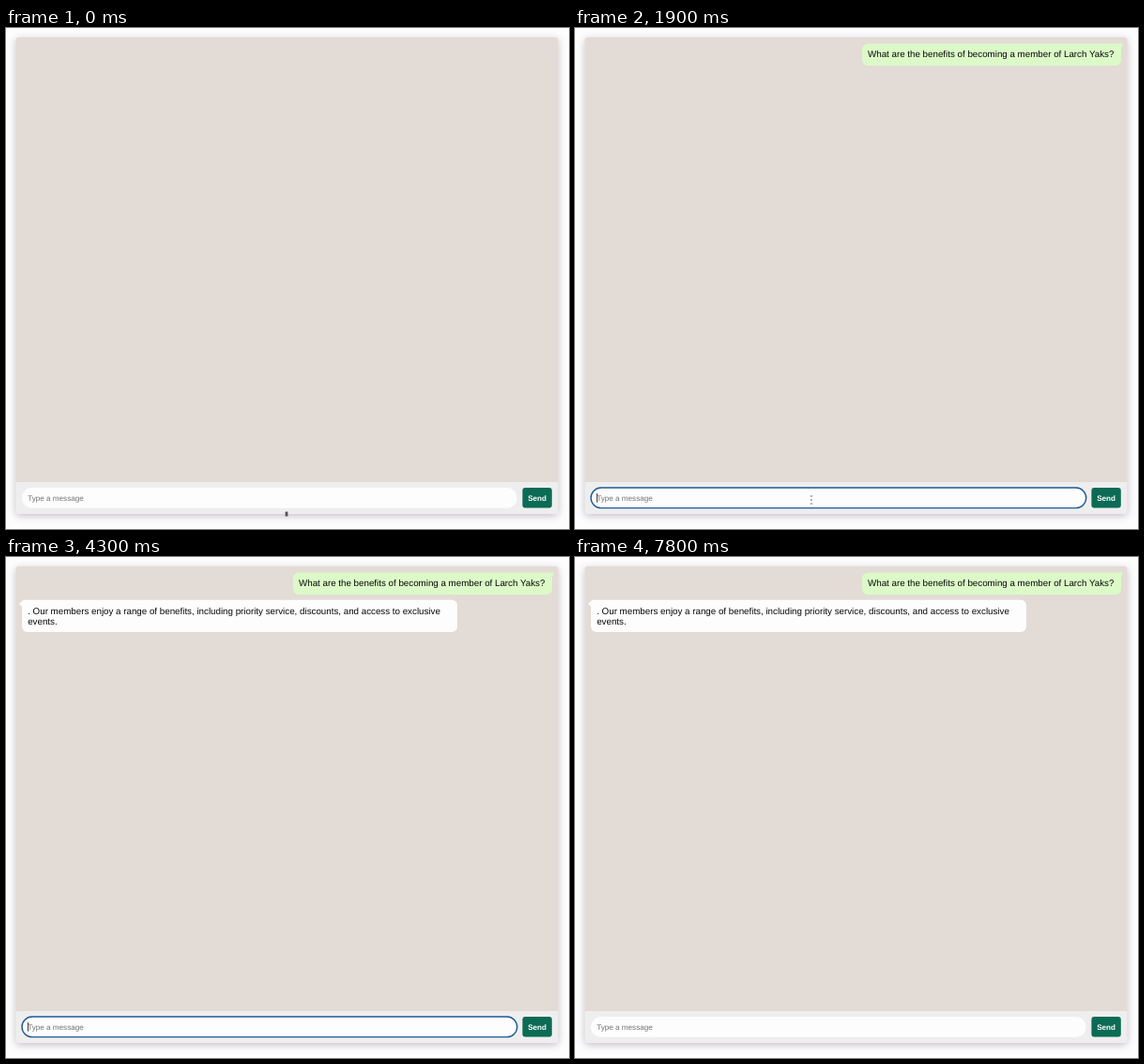
Write an HTML page that moves like this. It is 600 px wide and 534 px high and loops after 8 s.

```html
<!DOCTYPE html>
<html lang="en">
<head>
<meta charset="utf-8">
<title>Chat</title>
<style>
  html, body {
    margin: 0;
    width: 100%;
    height: 100%;
    overflow: hidden;
    background: #fefdfe;
  }
  svg {
    display: block;
    width: 600px;
    height: 534px;
    font-family: "Liberation Sans", Arial, sans-serif;
    text-rendering: geometricPrecision;
  }
  .panel { filter: drop-shadow(0 2px 4px rgba(40, 30, 50, .28)); }
  .msg { font-size: 9.77px; fill: #080808; }
  .small { font-size: 8.13px; }

  /* Everything switches in hard cuts on one 8 s clock. */
  .sent, .reply, .ring, .caret, .pointer { animation: 8s step-end infinite; }
  .sent { animation-name: sent; }
  .reply { animation-name: reply; }
  .ring { animation-name: focus; }
  .caret { animation-name: blink; }
  .pointer { animation-name: enter; }
  .tip, .beam { animation: 8s step-end infinite; }
  .tip { animation-name: tip; }
  .beam { animation-name: beam; }

  @keyframes sent { 0% { opacity: 0 } 20%, 100% { opacity: 1 } }
  @keyframes reply { 0% { opacity: 0 } 41.25%, 100% { opacity: 1 } }
  @keyframes focus {
    0% { opacity: 0 }
    7.5% { opacity: 1 }
    61.25%, 100% { opacity: 0 }
  }
  @keyframes blink {
    0% { opacity: 0 }
    7.5% { opacity: 1 }
    17.5% { opacity: 0 }
    23.75% { opacity: 1 }
    30% { opacity: 0 }
    36.25% { opacity: 1 }
    42.5% { opacity: 0 }
    48.75% { opacity: 1 }
    55%, 100% { opacity: 0 }
  }
  @keyframes enter {
    0% { transform: translate(299px, 518px); opacity: 1 }
    1.25% { transform: translate(275px, 510px); opacity: 1 }
    2.5% { transform: translate(252px, 503px); opacity: 1 }
    27.5%, 100% { transform: translate(252px, 503px); opacity: 0 }
  }
  @keyframes tip { 0% { opacity: 1 } 1.25%, 100% { opacity: 0 } }
  @keyframes beam { 0% { opacity: 0 } 1.25%, 100% { opacity: 1 } }
</style>
</head>
<body>
<svg viewBox="0 0 600 534">
  <rect class="panel" x="10.5" y="10" width="578" height="508" rx="3" fill="#efeeee"/>
  <path d="M10.5 484V13q0-3 3-3h572q3 0 3 3v471z" fill="#e3dbd5"/>

  <g class="sent">
    <path d="M576 16.5h7.5l-.5 3.5-3 3z" fill="#dcfac8"/>
    <rect x="306" y="16.7" width="276" height="23.3" rx="6" fill="#dcfac8"/>
    <text class="msg" x="312" y="31.3">What are the benefits of becoming a member of Larch Yaks?</text>
  </g>

  <g class="reply" fill="#fefdfe">
    <path d="M14 50l4.5-4.3H23v7h-6z"/>
    <rect x="17" y="45.7" width="464" height="34.3" rx="6"/>
    <text class="msg" x="23.2" y="60.7">. Our members enjoy a range of benefits, including priority service, discounts, and access to exclusive</text>
    <text class="msg" x="23.2" y="71.8">events.</text>
  </g>

  <rect x="17" y="490" width="527.5" height="21.7" rx="10.8" fill="#fefdfe"/>
  <rect class="ring" x="17" y="490" width="527.7" height="21.6" rx="10.8" fill="none" stroke="#1c5a98" stroke-width="1.4"/>
  <text class="small" x="23.2" y="503.5" fill="#747474">Type a message</text>
  <rect class="caret" x="23.1" y="496" width=".9" height="9.6" fill="#222"/>

  <rect x="550.4" y="490" width="31.4" height="21.5" rx="3" fill="#0b6b55"/>
  <text class="small" x="566.1" y="503.5" fill="#fff" font-weight="700" text-anchor="middle">Send</text>

  <g class="pointer">
    <rect class="tip" x="-1.4" y="-2.4" width="2.8" height="5" rx=".6" fill="#555"/>
    <path class="beam" d="M-1.4-4h2.6M-.1-1v2M-1.4 4h2.6" fill="none" stroke="#777" stroke-width="1.2"/>
  </g>
</svg>
</body>
</html>
```
